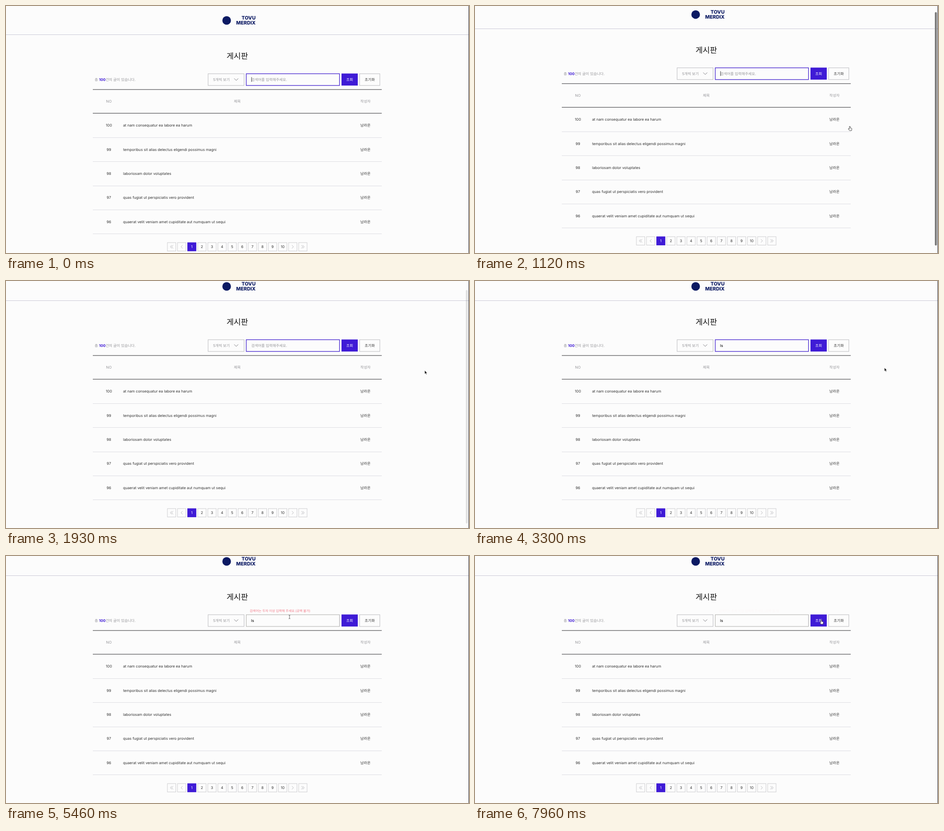
Animation, 1024 px wide and 547 px high, one loop 7.99 s. Source, as an HTML page:

```html
<!DOCTYPE html>
<html>
<head>
<meta charset="utf-8">
<title>Board</title>
<style>
html, body { margin: 0; width: 100%; height: 100%; overflow: hidden; background: #fcfcfc; }
svg { display: block; width: 100%; height: 100%; }
text {
  font-family: Inter, "Noto Sans CJK KR", "Noto Sans CJK", sans-serif;
  font-size: 8.1px; fill: #333; text-rendering: geometricPrecision; white-space: pre;
}
.mid { text-anchor: middle; }
.end { text-anchor: end; }
.gray { fill: #959599; }
.brand { font-size: 10.8px; font-weight: 800; fill: #0c1a63; }
.box { fill: none; stroke: #b9b9bd; }
.line { fill: none; stroke-linecap: round; stroke-linejoin: round; }
</style>
</head>
<body>
<svg viewBox="0 0 1024 547" preserveAspectRatio="none">
  <g id="page"></g>
  <rect id="thumb" x="1017" width="4.6" height="517" rx="2.3" fill="#7d7d7d"/>
  <rect x="1023" width="1" height="547" fill="#30303c"/>
  <g id="cursor">
    <path id="arrow" d="M0 0V8L1.9 6.3L3.2 9.2L4.5 8.7L3.2 5.9H5.6Z" fill="#111" stroke="#fff" stroke-width=".6"/>
    <path id="hand" d="M-1 1Q0 -.5 1 1V4L3.6 4.6Q4.6 4.9 4.4 6L3.8 10H-.6L-3.4 6.4Q-3.5 5 -2.2 5.5L-1 6.5Z" fill="#fff" stroke="#222" stroke-width=".8"/>
    <path id="beam" class="line" d="M-1.5 -4Q0 -4 0 -3V3Q0 4 -1.5 4M1.5 -4Q0 -4 0 -3M0 3Q0 4 1.5 4" stroke="#444" stroke-width=".8"/>
  </g>
</svg>
<script>
const NS = "http://www.w3.org/2000/svg";
const LOOP = 7990;
const PURPLE = "#3f1bd6";
const $ = id => document.getElementById(id);
const page = $("page");

function add(tag, attrs, content) {
  const el = document.createElementNS(NS, tag);
  for (const k in attrs) el.setAttribute(k, attrs[k]);
  if (content) el.textContent = content;
  page.appendChild(el);
  return el;
}
const label = (x, y, str, cls = "", more = {}) => add("text", { x, y, class: cls, ...more }, str);
const box = (x, y, width, height, more = {}) => add("rect", { x, y, width, height, class: "box", ...more });
const rule = (x, y, width, height, fill) => add("rect", { x, y, width, height, fill });
const stroke = (d, color, width = 1) => add("path", { d, class: "line", stroke: color, "stroke-width": width });

// Header
add("circle", { cx: 488, cy: 32, r: 9.5, fill: "#0c1a63" });
label(552, 30.3, "TOVU", "brand end");
label(552, 41, "MERDIX", "brand end");
rule(0, 63, 1023, 1, "#c9c8d6");
label(511.5, 117, "게시판", "mid", { style: "font-size:17.3px;font-weight:500;fill:#111" });

// Toolbar
const count = label(196, 165.7, "총 ", "gray");
for (const [str, css] of [["100", "font-weight:700;fill:" + PURPLE], ["건의 글이 있습니다.", ""]]) {
  const span = document.createElementNS(NS, "tspan");
  span.textContent = str;
  span.setAttribute("style", css);
  count.appendChild(span);
}
box(447, 150, 79.5, 26);
label(458, 165.7, "5개씩 보기", "gray");
stroke("M505 160.7l4.2 4.2 4.2-4.2", "#77777c");
const field = box(531.4, 150, 206.2, 26);
const hint = label(542.5, 165.7, "검색어를 입력해주세요.", "gray");
const typed = label(542, 165.8, "", "", { style: "font-weight:500;fill:#111" });
const caret = rule(542.6, 157.5, 0.9, 10.5, "#222");
rule(742, 149.5, 36, 26.7, PURPLE);
label(760, 165.8, "조회", "mid", { style: "fill:#fff;font-weight:500" });
box(782, 150, 44.8, 26);
label(804.5, 165.8, "초기화", "mid");
const warning = label(539, 143.6, "검색어는 두자 이상 입력해 주세요.(공백 불가)", "", { style: "font-size:7.07px;fill:#f0707f" });

// Table
rule(192, 184.4, 639, 1.2, "#4c4c50");
rule(192, 236.9, 639, 1.2, "#4c4c50");
label(227.5, 214, "NO", "mid gray");
label(511.5, 214, "제목", "mid gray");
label(795, 214, "작성자", "mid gray");
[
  "at nam consequatur ea labore ea harum",
  "temporibus sit alias delectus eligendi possimus magni",
  "laboriosam dolor voluptates",
  "quas fugiat ut perspiciatis vero provident",
  "quaerat velit veniam amet cupiditate aut numquam ut sequi"
].forEach((str, i) => {
  const y = 267.4 + i * 53.35;
  label(227.5, y, 100 - i, "mid");
  label(259, y, str, "", { style: "font-size:8.15px" });
  label(795, y, "남라온", "mid");
  rule(192, Math.round(291 + i * 53.35), 639, 1, "#dcdce2");
});

// Pagination
const chevron = (x, dir) => stroke(`M${x + dir * 1.6} 530l${-dir * 3.2} 3.2 ${dir * 3.2} 3.2`, "#a5a5aa", 0.8);
for (let i = 0; i < 14; i++) {
  const x = 366.3 + i * 22.33;
  const on = i === 2;
  box(x - 9.3, 524, 18.6, 18.6, on ? { style: `fill:${PURPLE};stroke:${PURPLE}` } : { style: "stroke:#cdcdd0" });
  if (i > 1 && i < 12) {
    label(x, 536.2, i - 1, "mid", { style: "font-size:8.15px" + (on ? ";fill:#fff" : "") });
  } else {
    const dir = i < 2 ? 1 : -1;
    const double = i === 0 || i === 13;
    for (const dx of double ? [-1.5, 1.5] : [0]) chevron(x + dx, dir);
  }
}

// Motion: [time, x, y]
const route = [
  [260, 829, 266], [1770, 829, 266], [1930, 926, 198], [2000, 927, 198.5],
  [3130, 927, 198.5], [3900, 757, 147], [4450, 758, 146], [4750, 758, 146],
  [5460, 627, 135], [5560, 627, 135], [5900, 575, 90], [6320, 684, 98],
  [6360, 684, 98], [6650, 727, 56], [6960, 729, 92], [7120, 734, 112],
  [7290, 759, 135], [7670, 759, 135], [7960, 766, 141]
];
const clamp = v => Math.min(1, Math.max(0, v));
const part = (t, a, b) => clamp((t - a) / (b - a));
const smooth = p => p * p * (3 - 2 * p);
const easeOut = p => 1 - (1 - p) ** 2;

// CSS "ease" curve
function ease(p) {
  let lo = 0, hi = 1, s = p;
  for (let i = 0; i < 16; i++) {
    s = (lo + hi) / 2;
    const x = 0.75 * s * (1 - s) ** 2 + 0.75 * s * s * (1 - s) + s ** 3;
    if (x < p) lo = s; else hi = s;
  }
  return 0.3 * s * (1 - s) ** 2 + 3 * s * s * (1 - s) + s ** 3;
}

function place(t) {
  let i = 0;
  while (i < route.length - 2 && t >= route[i + 1][0]) i++;
  const [a, ax, ay] = route[i], [b, bx, by] = route[i + 1];
  const p = smooth(part(t, a, b));
  return [ax + (bx - ax) * p, ay + (by - ay) * p];
}

const inside = (x, y, l, t, r, b) => x >= l && x <= r && y >= t && y <= b;
function shapeAt(x, y) {
  if (inside(x, y, 742, 149, 778, 176) || inside(x, y, 192, 238, 831, 504)) return "hand";
  if (inside(x, y, 531, 149, 738, 176) || inside(x, y, 539, 137, 673, 145)) return "beam";
  return "arrow";
}

const flash = (t, start) => t < start ? 0 : ease(part(t, start, start + 1500)) - ease(part(t, start + 1500, start + 3000));
const show = (el, on) => el.setAttribute("visibility", on ? "visible" : "hidden");

function draw(t) {
  const scroll = 8 * easeOut(part(t, 260, 780)) + 12 * easeOut(part(t, 1000, 1500));
  page.setAttribute("transform", `translate(0 ${-scroll})`);

  const thumb = $("thumb");
  thumb.setAttribute("y", 1 + scroll * 0.95);
  thumb.setAttribute("opacity", t < 260 ? 0 : 1 - smooth(part(t, 1770, 2000)));

  const focus = t < 4340;
  field.setAttribute("style", focus ? "stroke:#4a2bd0;stroke-width:1.4" : "stroke:#ababa8;stroke-width:1");
  const word = t < 2160 ? "" : t < 2630 ? "I" : "Is";
  if (typed.textContent !== word) typed.textContent = word;
  show(hint, !word);
  caret.setAttribute("x", [542.6, 545, 549.2][word.length]);
  show(caret, t < 1800 || (t >= 2160 && t < 3130) || (t >= 3630 && t < 4130));
  warning.setAttribute("opacity", Math.max(flash(t, 4430), flash(t, 7870)));

  const [x, y] = place(t);
  const shape = shapeAt(x, y + scroll);
  $("cursor").setAttribute("transform", `translate(${x} ${y})`);
  for (const id of ["arrow", "hand", "beam"]) show($(id), t >= 260 && id === shape);
}

const start = performance.now();
function tick() {
  draw((performance.now() - start) % LOOP);
  requestAnimationFrame(tick);
}
tick();
</script>
</body>
</html>
```
